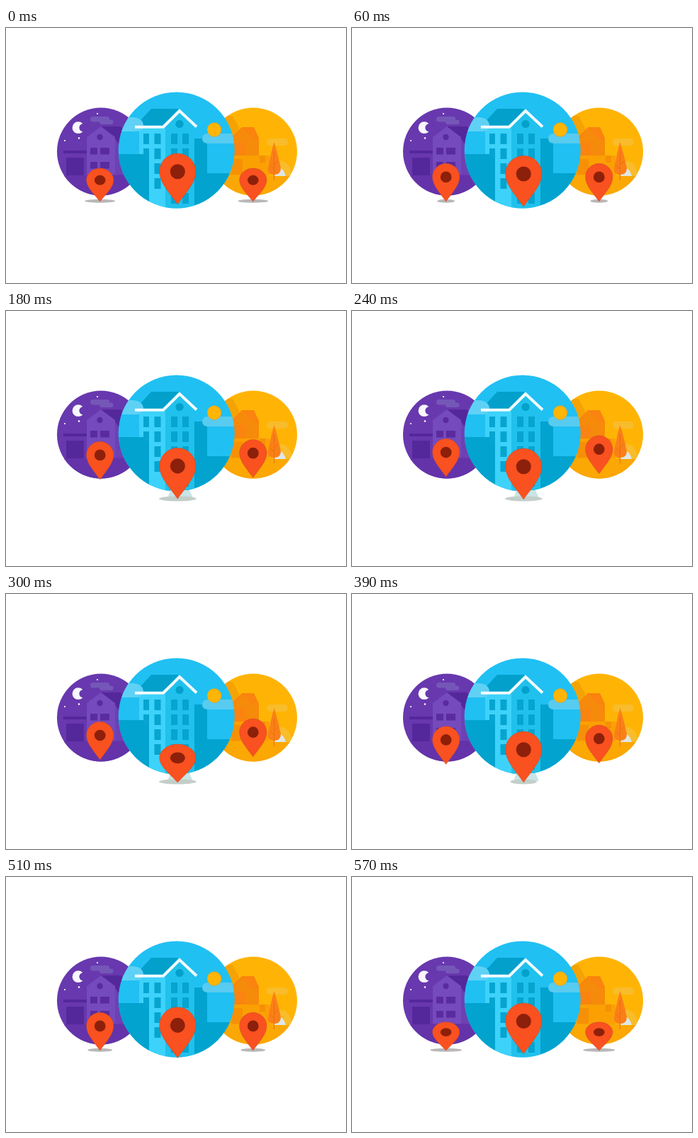
Write an HTML page that moves like this. It is 480x360 px and loops after 0.66 s.

```html
<!DOCTYPE html>
<html lang="en">
<head>
<meta charset="utf-8">
<title>Bouncing map pins</title>
<style>
html, body { margin: 0; width: 100%; height: 100%; overflow: hidden; background: #fff; }
svg { display: block; width: 100%; height: 100%; }
</style>
</head>
<body>
<svg viewBox="0 0 480 360">
  <defs>
    <clipPath id="nightClip"><circle cx="134" cy="174.5" r="62"/></clipPath>
    <clipPath id="sunsetClip"><circle cx="349" cy="174.5" r="62"/></clipPath>
    <clipPath id="dayClip"><circle cx="240.7" cy="172.5" r="82"/></clipPath>
    <g id="pin">
      <path fill="#f9511f" stroke="#b5482c" stroke-opacity=".6" stroke-width=".6" vector-effect="non-scaling-stroke"
        d="M0 0C-.38-.55-1-1.18-1-1.8A1 1 0 0 1 1-1.8C1-1.18 .38-.55 0 0Z"/>
      <circle cy="-1.8" r=".41" fill="#8d200b"/>
    </g>
  </defs>

  <g clip-path="url(#nightClip)">
    <path fill="#6838ae" d="M70 110H200V240H70Z"/>
    <g fill="#fff">
      <circle cx="129" cy="121" r="1.1"/><circle cx="83" cy="159" r="1.1"/>
      <circle cx="103" cy="155.5" r="1.3"/><circle cx="145" cy="130" r=".8"/>
    </g>
    <circle cx="102" cy="140.7" r="8.4" fill="#f8f7fe"/>
    <circle cx="109" cy="140.7" r="5.6" fill="#6838ae"/>
    <g fill="#7557b8">
      <rect x="119" y="125" width="27" height="7.5" rx="3.7"/>
      <rect x="132" y="129.5" width="19.5" height="6.5" rx="3.2"/>
    </g>
    <path fill="#6433a9" d="M70 208H200V240H70Z"/>
    <path fill="#54289a" d="M81 173H115V177H81ZM85 183H110V208H85Z"/>
    <path fill="#6d40b4" d="M153 154H182V207H153Z"/>
    <path fill="#54289a" d="M134 139H162L182 158V165H160L153 155Z"/>
    <path fill="#744abc" d="M114 154L134 139L154 154V207H114Z"/>
    <circle cx="132.5" cy="154" r="4.2" fill="#5a2b9f"/>
    <g id="nightWindows" fill="#5a2b9f"></g>
  </g>

  <g clip-path="url(#sunsetClip)">
    <path fill="#ffb405" d="M285 110H415V240H285Z"/>
    <path fill="#f5a204" d="M308 124H320L329 141V236H308Z"/>
    <path fill="#fba003" d="M322 180H372V208H322Z"/>
    <path fill="#fb830f" d="M318 155L333 140H350L357 155V180H318Z"/>
    <path fill="#f68a0a" d="M318 160L334 141L349 157H357V180H337V162H318Z"/>
    <path fill="#f69006" d="M318 185H334V207H318ZM358 180H366V190H358Z"/>
    <path fill="#fba704" d="M310 208H412V240H310Z"/>
    <g fill="#f8bc2c">
      <rect x="368" y="156" width="30" height="10" rx="5"/>
      <path d="M379 209V188Q402 184 403 209Z"/>
    </g>
    <path fill="#dfe7e4" d="M379 209Q382 198 388 198Q393 201 395 209Z"/>
    <path fill="#fb7f18" d="M378.5 161Q384 178 388 198Q388 207 378.5 207Q369 207 370 198Q374 176 378.5 161Z"/>
    <path fill="none" stroke="#e8700c" d="M378.5 174V215M378.5 193L384 188M378.5 199L373 194"/>
  </g>

  <g clip-path="url(#dayClip)">
    <path fill="#20c0f3" d="M155 88H325V258H155Z"/>
    <path fill="#02a3cf" d="M155 178H202V258H155ZM266 156H284V205H325V258H266Z"/>
    <path fill="#02a0cb" d="M205 114H244L222 138H183Z"/>
    <path fill="#3dd2fa" d="M188 142H226V258H202V178H188Z"/>
    <path fill="#20c1ec" d="M225 140L245 119L266 140V258H225Z"/>
    <g id="dayWindows" fill="#06a4d0"></g>
    <circle cx="245" cy="135.5" r="5.6" fill="#02a0cb"/>
    <path fill="#5fd1f5" d="M155 146V134Q164 126 172 126H180Q192 127 194 136Q194 146 184 146Z"/>
    <path fill="none" stroke="#f2fbfd" stroke-width="4" d="M182 139.700H222L245 117L269 139.500"/>
    <path fill="#58cbf0" d="M284 149H325V163H284Q277 162 277 156Q277 150 284 149Z"/>
    <circle cx="294" cy="143.500" r="10" fill="#ffb506" stroke="#b9a04a" stroke-width=".6"/>
  </g>

  <path id="haze" fill="#c9e4e6" d="M232 253H259L264 264H228Z"/>
  <g id="pins"></g>
</svg>
<script>
const STEP = 30, LOOP = 660, CYCLE = 600;
const FLIGHT = 210;  // apex to ground
const SQUASH = 60;   // deepest squash to full height
const NS = 'http://www.w3.org/2000/svg';
const $ = id => document.getElementById(id);

function add(parent, tag, attrs) {
  const node = document.createElementNS(NS, tag);
  for (const key in attrs) node.setAttribute(key, attrs[key]);
  return parent.appendChild(node);
}

function column(id, x, y, rows, gap, width, height) {
  for (let i = 0; i < rows; i++) add($(id), 'rect', { x, y: y + i * gap, width, height });
}
column('nightWindows', 119, 169, 2, 20, 10, 9.5);
column('nightWindows', 133, 169, 2, 20, 13, 9.5);
column('dayWindows', 194, 149, 2, 21, 8, 15);
column('dayWindows', 209.5, 149, 4, 21, 9, 15);
column('dayWindows', 233, 149, 5, 21, 9, 15);
column('dayWindows', 249, 149, 5, 21, 9, 15);

const small = { r: 19.2, ground: 245, apex: 270, shadow: 22.5, fadeFrom: 180, lag: 0, shade: '#b9b7b8' };
const pins = [
  { ...small, x: 132.7, jump: 11.5 },
  { ...small, x: 348.8, jump: 16 },
  { x: 242.3, r: 25.7, ground: 266, apex: 0, jump: 17, shadow: 26.5, fadeFrom: 120, lag: 40, shade: '#c3cec8' }
];

for (const p of pins) {
  p.shadowNode = add($('pins'), 'ellipse', { cx: p.x, cy: p.ground - p.r / 25, ry: p.r / 7.5, fill: p.shade });
  p.node = add($('pins'), 'use', { href: '#pin' });
}

// Smooth bump: 1 at the centre, 0 at the given distance and beyond.
const bump = (d, width) => Math.abs(d) < width ? (1 + Math.cos(Math.PI * d / width)) / 2 : 0;

// Time from the apex to t, the short way round the cycle.
function distance(t, apex) {
  const d = Math.abs(t - apex) % CYCLE;
  return Math.min(d, CYCLE - d);
}

function draw(now) {
  const t = Math.min(CYCLE - STEP, Math.floor(now % LOOP / STEP) * STEP);
  for (const p of pins) {
    const d = distance(t, p.apex);
    const tip = p.ground - p.jump * bump(d, FLIGHT);
    const squash = 1 - 0.25 * bump(CYCLE / 2 - d, SQUASH);
    p.node.setAttribute('transform', `translate(${p.x} ${tip}) scale(${p.r} ${p.r * squash})`);

    const near = (distance(t + p.lag, p.apex) - p.fadeFrom) / 100;
    p.shadowNode.setAttribute('rx', p.shadow * Math.sqrt(Math.max(0, Math.min(1, near))));
  }
  $('haze').setAttribute('visibility', distance(t, 0) > 140 ? 'visible' : 'hidden');
}

const start = performance.now();
function tick() {
  draw(performance.now() - start);
  requestAnimationFrame(tick);
}
tick();
</script>
</body>
</html>
```
